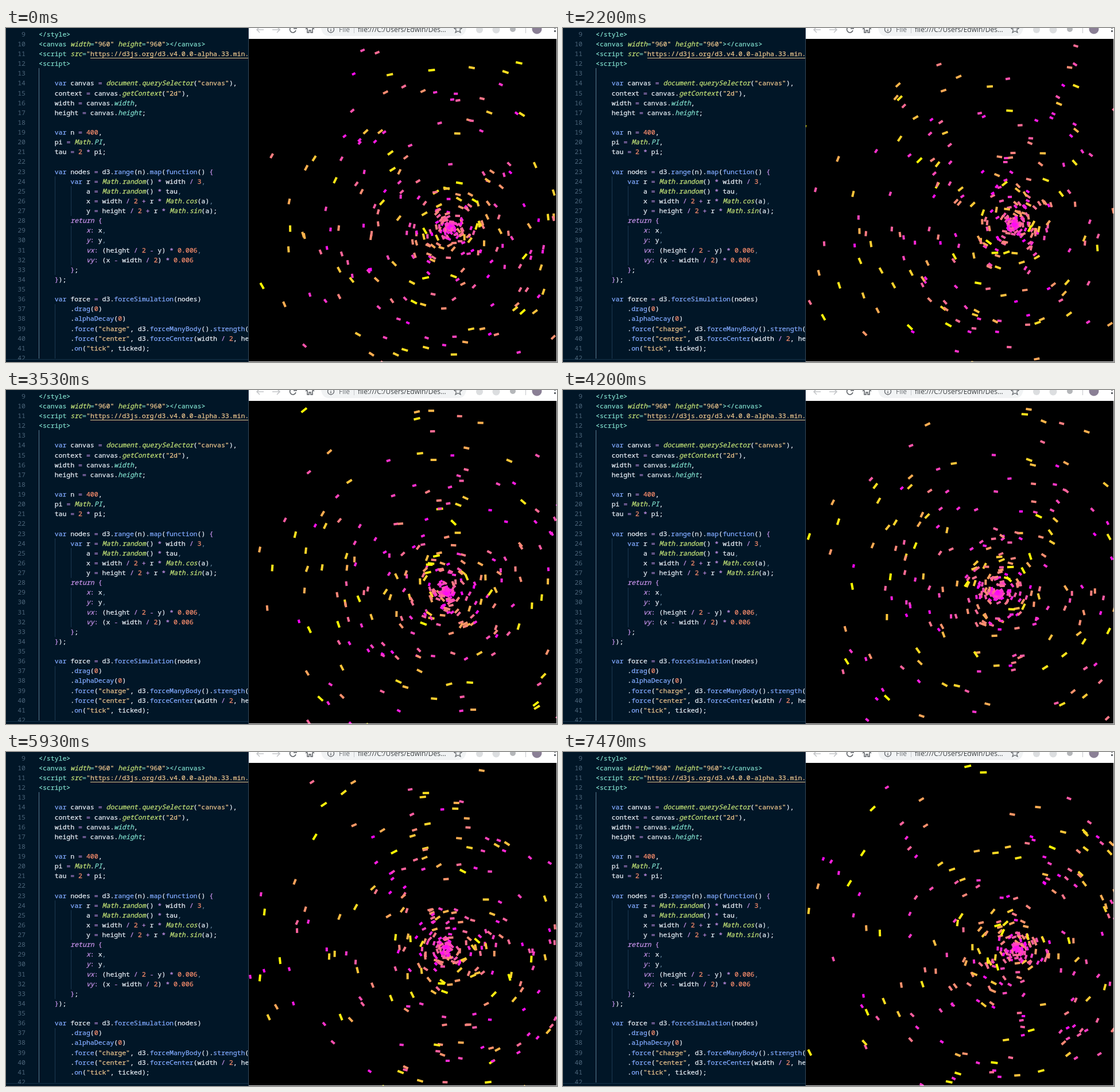
These frames come from a looping animation (960 px wide and 583 px high, 7540 ms). An HTML page with a canvas:

```html
<!DOCTYPE html>
<html lang="en">
<head>
<meta charset="utf-8">
<title>Charged galaxy</title>
<style>
html, body { margin: 0; width: 960px; height: 583px; overflow: hidden; background: #011627; }
pre { position: absolute; top: 1.8px; margin: 0; height: 577px; overflow: hidden;
  font: 11.53px/17.13px "Noto Sans Mono", "DejaVu Sans Mono", monospace; color: #eaf0f8; }
#nums { left: 0; width: 34px; text-align: right; color: #4b6479; }
#code { left: 57px; width: 365px; -webkit-text-stroke: 0.25px; }
.t { color: #7fdbca; }
.c { color: #7fdbca; font-style: italic; }
.g { color: #c5e478; font-style: italic; }
.s { color: #ecc48d; }
.l { color: #ecc48d; text-decoration: underline; text-underline-offset: 3px; }
.p { color: #c792ea; }
.k { color: #c792ea; font-style: italic; }
.b { color: #82aaff; }
.n { color: #f78c6c; }
.d { color: #5f7e97; }
svg, canvas { position: absolute; left: 0; top: 0; }
canvas { left: 423px; top: 19px; background: #000; }
</style>
</head>
<body>
<svg width="960" height="583" fill="none">
  <path d="M57.5 70V577" stroke="#5b7a90"/>
  <path d="M85.5 259V431M85.5 482V577M113.5 276V328M113.5 345V414" stroke="#1b3850"/>
  <path d="M0 578.5H422" stroke="#16334a"/>
  <path d="M422.5 0V583" stroke="#33475a"/>
  <path d="M423 582.5H959.5V19" stroke="#e0e0e0"/>
  <path d="M423 0H960V19H423Z" fill="#fff"/>
  <path d="M549 0H802Q800 14 788 14H563Q551 14 549 0Z" fill="#f1f3f4"/>
  <g stroke="#c4c6c9" stroke-width="1.6">
    <path d="M449 3H437M442 -2L437 3L442 8"/>
    <path d="M464 3H477M472 -2L477 3L472 8"/>
  </g>
  <g stroke="#5f6368" stroke-width="1.6">
    <path d="M496 -1A5.3 5.3 0 1 0 505 4M506 -3V1H501"/>
    <path d="M522 2L529.5 -4L537 2M525 1V8H528V4H531V8H534V1"/>
    <circle cx="566" cy="2.5" r="5.5" stroke-width="1.3"/>
    <path d="M566 2V6M566 -1V.5" stroke-width="1.3"/>
    <path d="M787.5 -4L789 0L794 .5L790.5 3.5L792 8L787.5 5.5L783 8L784.5 3.5L781 .5L786 0Z" stroke-width="1.2"/>
  </g>
  <g font-family="Open Sans, Noto Sans, sans-serif" font-size="12">
    <text x="580" y="7" fill="#6b6f74">File</text>
    <text x="613" y="7" fill="#3c4043">file:///C:/Users/Edwin/Des...</text>
  </g>
  <path d="M606.5 0V9M905.5 0V9" stroke="#c4c6c9"/>
  <g fill="#dcdee0">
    <circle cx="825" cy="3" r="6"/>
    <circle cx="854" cy="3" r="6.5"/>
    <circle cx="883" cy="2" r="5" fill="#b5b7ba"/>
  </g>
  <circle cx="925" cy="2" r="8.5" fill="#8a7f95"/>
  <path d="M955 -2h3v3h-3zM955 4h3v3h-3z" fill="#5f6368"/>
</svg>
<pre id="nums"></pre>
<pre id="code"></pre>
<canvas width="536" height="563"></canvas>
<script>
// ~x...~ gives a run of text the class x
const source = String.raw`~t</style>~
~t<canvas~ ~gwidth~~t=~~s"960"~ ~gheight~~t=~~s"960"~~t></canvas>~
~t<script~ ~gsrc~~t=~~s"~~lhttps://d3js.org/d3.v4.0.0-alpha.33.min.js~~s"~
~t<script>~

    ~bvar~ canvas = ~gdocument.querySelector~(~s"canvas"~),
    context = canvas.~ggetContext~(~s"2d"~),
    width = canvas.~cwidth~,
    height = canvas.~cheight~;

    ~bvar~ n = 400,
    pi = ~gMath~.~cPI~,
    tau = 2 * pi;

    ~bvar~ nodes = d3.~brange~(n).~bmap~(~bfunction~() ~p{~
        ~bvar~ r = ~gMath.random~() * width / 3~d,~
            a = ~gMath.random~() * tau~d,~
            x = width / 2 + r * ~gMath.cos~(a)~d,~
            y = height / 2 + r * ~gMath.sin~(a);
        ~kreturn~ ~p{~
            ~kx~~p:~ x~d,~
            ~ky~~p:~ y~d,~
            ~kvx~~p:~ (height / 2 - y) * 0.006~d,~
            ~kvy~~p:~ (x - width / 2) * 0.006
        ~p}~;
    ~p}~);

    ~bvar~ force = d3.~bforceSimulation~(nodes)
        .~bdrag~(0)
        .~balphaDecay~(0)
        .~bforce~(~s"charge"~, d3.~bforceManyBody~().~bstrength~(
        .~bforce~(~s"center"~, d3.~bforceCenter~(width / 2, height / 2))
        .~bon~(~s"tick"~, ticked);
`;
const span = (type, text) => `<span class="${type}">${text}</span>`;
document.getElementById("code").innerHTML = source.replace(/</g, "&lt;").replace(
  /~(.)(.*?)~|( [=*\/+-] )|\b(\d[\d.]*)\b/g,
  (all, type, text, op, num) => type ? span(type, text) : op ? span("p", op) : span("n", num));
document.getElementById("nums").textContent =
  Array.from({ length: 34 }, (_, i) => i + 9).join("\n");

const LOOP = 7540, STEP = 200 / 3, CX = 773, CY = 347, TAU = 2 * Math.PI;
const ctx = document.querySelector("canvas").getContext("2d");
ctx.translate(-423, -19);
ctx.lineWidth = 4;

let seed = 11;
const random = () => (seed = seed * 16807 % 2147483647) / 2147483647;

// Dense magenta core, thinning outwards; tone runs from magenta (0) to yellow (1)
const nodes = Array.from({ length: 370 }, () => {
  const mean = 350 * random() ** 1.8;
  const tone = random() * Math.min(1, 0.25 + mean / 70);
  const green = Math.round(255 * tone);
  return {
    mean,
    angle: TAU * random(),
    phase: TAU * random(),
    ecc: random() * (mean > 150 ? 0.22 : 0.55),
    spin: 130 / (mean + 30),
    drift: Math.exp(-mean / 120),
    length: 6 + 6 * tone,
    color: `rgb(255,${green},${255 - green})`
  };
});

// Rosette orbit around a core that sways slowly
function place(n, t) {
  const r = n.mean * (1 + n.ecc * Math.cos(n.phase + 1.4 * n.spin * t));
  const a = n.angle + n.spin * t;
  return [
    CX + r * Math.cos(a) + n.drift * 18 * Math.sin(1.01 * t),
    CY + r * Math.sin(a) - n.drift * 9 * Math.sin(1.2 * t)
  ];
}

function draw() {
  const t = Math.floor(performance.now() % LOOP / STEP) * STEP / 1000;
  ctx.clearRect(423, 19, 536, 563);
  for (const n of nodes) {
    const [x, y] = place(n, t), [x2, y2] = place(n, t + 0.01);
    const a = Math.atan2(y2 - y, x2 - x);
    const dx = Math.cos(a) * n.length / 2, dy = Math.sin(a) * n.length / 2;
    ctx.strokeStyle = n.color;
    ctx.beginPath();
    ctx.moveTo(x - dx, y - dy);
    ctx.lineTo(x + dx, y + dy);
    ctx.stroke();
  }
  requestAnimationFrame(draw);
}
draw();
</script>
</body>
</html>
```
